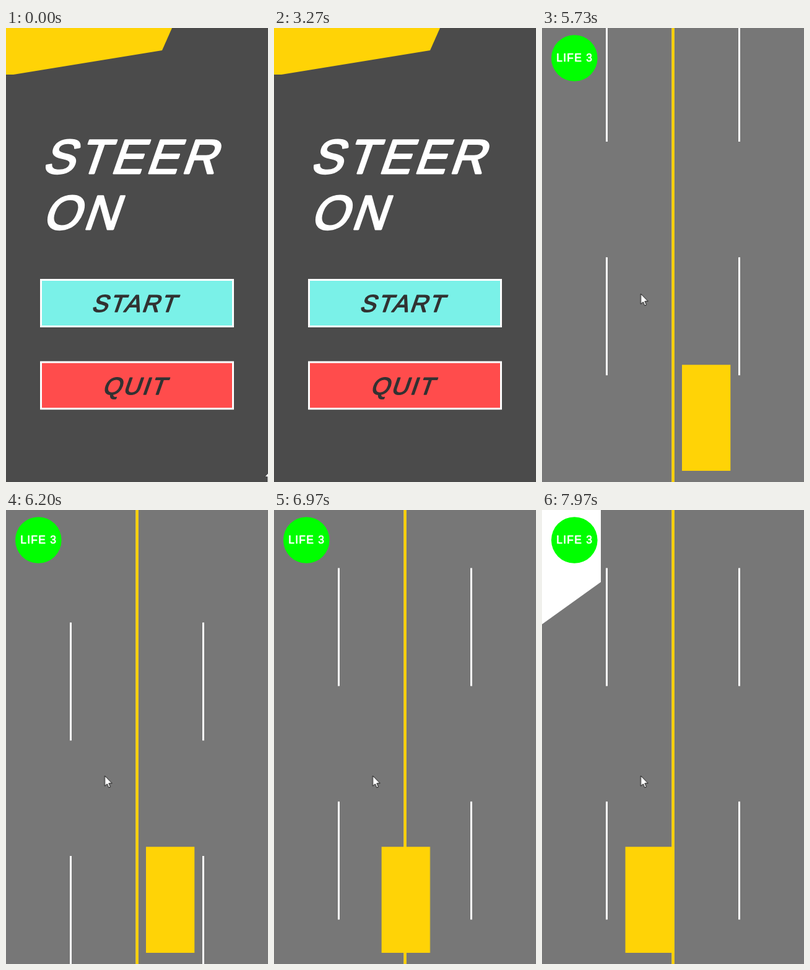
An HTML page for the animation above (8 s loop, 423 px wide and 731 px high).

```html
<!DOCTYPE html>
<html lang="en">
<head>
<meta charset="utf-8">
<title>Steer On</title>
<style>
  html, body { margin: 0; width: 100%; height: 100%; overflow: hidden; background: #4b4b4b; }
  svg { display: block; width: 423px; height: 731px; }
  text {
    font-family: "Liberation Sans", Arial, sans-serif;
    letter-spacing: .07em;
    stroke-linejoin: round;
    white-space: pre;
  }
  .title { font-size: 77.5px; fill: #fff; stroke: #fff; stroke-width: 2.8px; }
  .label { font-size: 39px; fill: #323232; stroke: #323232; stroke-width: 1.5px; }
  .life { font-size: 17.5px; fill: #fff; stroke: #fff; stroke-width: .6px; }
  .button { stroke: #fff; stroke-width: 3px; }

  /* One loop is 8 s at 30 steps per second, so 1% is 80 ms. */
  .game, .press, .pointer, .car, .block, .resize { animation: 8s linear infinite; }
  .game { animation-name: game; animation-timing-function: step-end; }
  .press { animation-name: press; }
  .pointer { animation-name: point; }
  .car { animation-name: steer; }
  .block { animation-name: drop; }
  .resize { animation-name: resize; animation-timing-function: step-end; }
  .dashes { animation: roll 1s steps(30) infinite; }

  @keyframes game {
    0% { visibility: hidden; }
    65.42%, 100% { visibility: visible; }
  }
  @keyframes press {
    0%, 60% { fill: #7af1e8; stroke: #fff; }
    61.25%, 63.3% { fill: #75e7df; stroke: #f5f5f5; }
    64.9%, 100% { fill: #60bdb6; stroke: #c8c8c8; }
  }
  @keyframes resize {
    0% { transform: translate(0, 0); }
    .83% { transform: translate(2px, 2px); }
    2.08%, 100% { transform: translate(20px, 2px); }
  }
  @keyframes point {
    0% { transform: translate(430px, 740px); }
    4.17% { transform: translate(430px, 740px); animation-timing-function: steps(18); }
    11.67% { transform: translate(232px, 449px); animation-timing-function: step-end; }
    18.33% { transform: translate(238px, 439px); animation-timing-function: step-end; }
    18.75% { transform: translate(243px, 448px); }
    30% { transform: translate(243px, 448px); animation-timing-function: steps(7); }
    32.92% { transform: translate(209px, 438px); }
    34.58% { transform: translate(209px, 438px); animation-timing-function: steps(3); }
    35.83% { transform: translate(181px, 437px); }
    39.17% { transform: translate(181px, 437px); animation-timing-function: steps(3); }
    40.42% { transform: translate(121px, 350px); animation-timing-function: step-end; }
    40.83% { transform: translate(-50px, 350px); animation-timing-function: step-end; }
    57.08% { transform: translate(118px, 345px); animation-timing-function: steps(14); }
    62.92%, 100% { transform: translate(159.5px, 428px); }
  }
  @keyframes steer {
    0% { transform: none; }
    77.5% { transform: none; animation-timing-function: steps(12); }
    82.5% { transform: translateX(-61.7px); animation-timing-function: steps(22); }
    91.67% { transform: translateX(-43px); animation-timing-function: steps(20); }
    100% { transform: translateX(-94px); }
  }
  @keyframes drop {
    0% { transform: translateY(-184px); }
    95% { transform: translateY(-184px); animation-timing-function: steps(12); }
    100% { transform: translateY(16.7px); }
  }
  @keyframes roll {
    to { transform: translateY(376px); }
  }
</style>
</head>
<body>
<svg viewBox="0 0 423 731">
  <defs>
    <g id="dash">
      <rect x="103" width="3" height="190"/>
      <rect x="317" width="3" height="190"/>
    </g>
  </defs>

  <g class="menu">
    <rect width="423" height="731" fill="#4b4b4b"/>
    <path d="M0 0H268L252 36L12 75H0Z" fill="#ffd306"/>
    <text class="title" transform="matrix(1 0 -.35 1 57.6 233.5)">STEER</text>
    <text class="title" transform="matrix(1 0 -.35 1 57.6 323.5)">ON</text>
    <rect class="button press" x="56.5" y="405.5" width="310" height="75"/>
    <rect class="button" x="56.5" y="538" width="310" height="75" fill="#ff4c4c"/>
    <text class="label" transform="matrix(1 0 -.35 1 137.2 457)">START</text>
    <text class="label" transform="matrix(1 0 -.35 1 154.8 589.5)">QUIT</text>
  </g>

  <g class="game">
    <rect width="423" height="731" fill="#777"/>
    <g class="dashes" fill="#fff">
      <use href="#dash" y="-270"/>
      <use href="#dash" y="106"/>
      <use href="#dash" y="482"/>
    </g>
    <rect x="209" width="5" height="731" fill="#d9c24a"/>
    <rect x="210" width="3.5" height="731" fill="#f9d006"/>
    <rect class="car" x="226" y="542.3" width="78.3" height="170.7" fill="#ffd306"/>
    <path class="block" d="M0 -60H95V116L0 184Z" fill="#fff"/>
    <circle cx="52.3" cy="48.5" r="37.3" fill="#0f0"/>
    <text class="life" x="23.2" y="53.8">LIFE 3</text>
  </g>

  <path class="resize" d="M423.5 716.5L418 722.5H422V733H425V722.5H429Z" fill="#fff" stroke="#222" stroke-width=".6"/>
  <path class="pointer" d="M0 0V16.5L3.8 13L6.4 19L9 17.9L6.5 12H11.6Z" fill="#fff" stroke="#111" stroke-width="1"/>
</svg>
</body>
</html>
```
